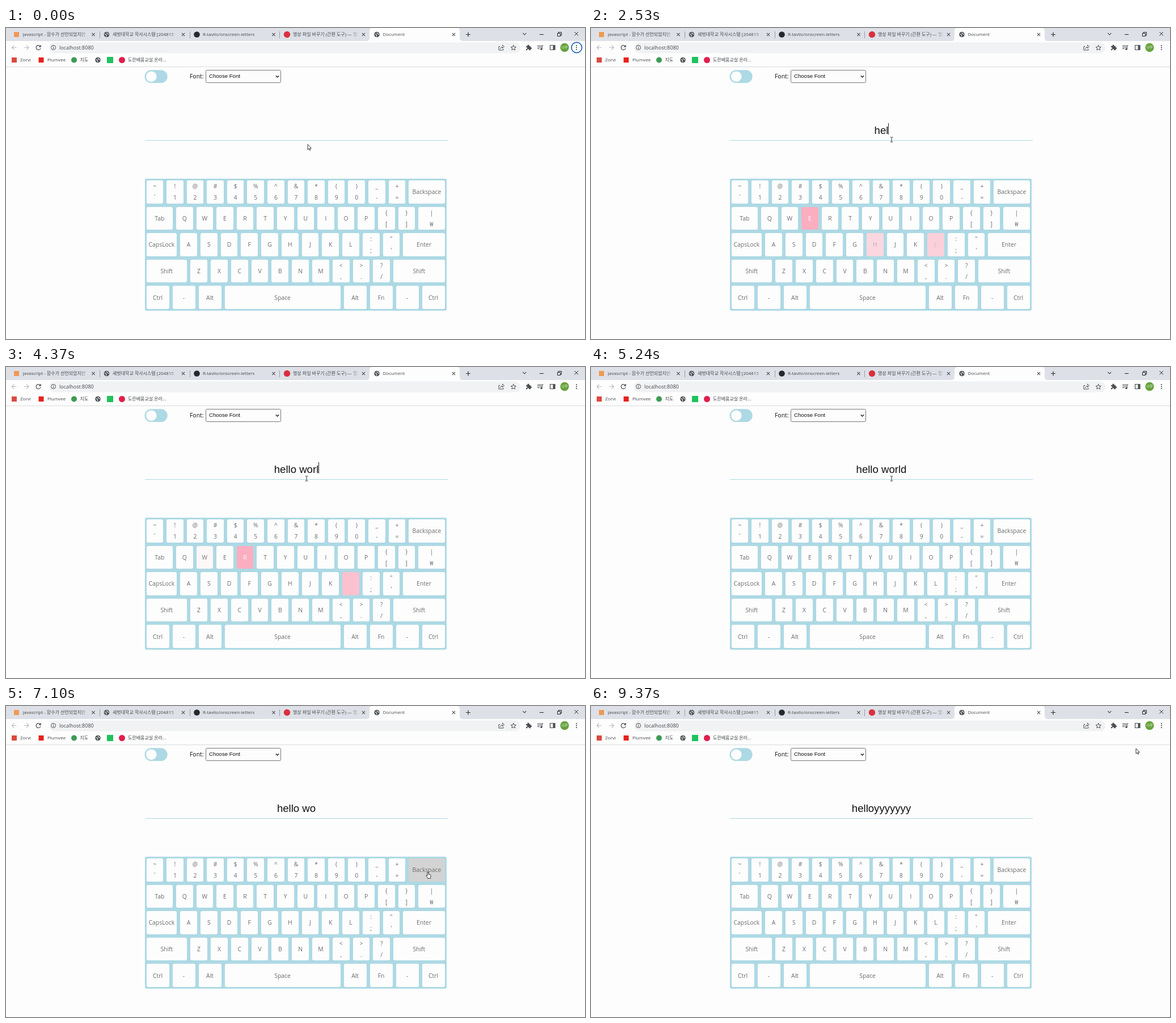
An HTML page for the animation above (9.4 s loop, 1021 by 549 pixels).

```html
<!DOCTYPE html>
<html lang="ko">
<head>
<meta charset="utf-8">
<title>Document</title>
<style>
  html, body { margin: 0; width: 100%; height: 100%; overflow: hidden; background: #fdfdfd; }
  #stage { position: relative; width: 1021px; height: 549px; overflow: hidden; background: #fdfdfd;
    font-family: "Open Sans", "Noto Sans CJK KR", "Noto Sans CJK", sans-serif; }
  #stage > * { position: absolute; }
  svg { left: 0; top: 0; }
  .label { white-space: pre; line-height: 16px; overflow: hidden; color: #45494d; }
  .fade { -webkit-mask-image: linear-gradient(90deg, #000 85%, transparent); mask-image: linear-gradient(90deg, #000 85%, transparent); }
  #field { left: 245px; top: 163px; width: 534px; height: 35px; border-bottom: 1.6px solid #add9e4;
    display: flex; justify-content: center; align-items: center; white-space: pre;
    font: 18.6px/21px "Liberation Sans", Arial, sans-serif; color: #111; }
  #text { position: relative; height: 21px; }
  #caret { position: absolute; left: 100%; top: -2px; width: 1px; height: 20px; background: #222; }
  #board { left: 244.5px; top: 266px; width: 532px; height: 232.5px; border-radius: 3px; background: #add9e4; }
  .row { position: absolute; left: 3px; width: 526.1px; height: 40.5px; display: flex; gap: 6px; }
  .key { flex: 1 1 0; min-width: 0; border-radius: 3px; display: flex; flex-direction: column;
    align-items: center; justify-content: center; font-size: 10.4px; line-height: 20px; white-space: pre; }
</style>
</head>
<body>
<div id="stage">
  <svg id="chrome" width="1021" height="549" fill="none" stroke="#4a4e52" stroke-width="1.2">
    <g stroke="none">
      <path fill="#dde1e7" d="M0 0H1021V23H0Z"/>
      <path fill="#fdfdfd" d="M635 23Q641 23 641 17V5Q641 0 646 0H795Q800 0 800 5V17Q800 23 806 23Z"/>
      <rect x="76" y="25.5" width="831" height="19" rx="9.5" fill="#f0f2f4"/>
      <path fill="#d9dbdf" d="M0 68H1021V69H0Z"/>
      <rect x="14" y="7" width="9" height="9" fill="#ee9a55"/>
      <circle cx="336.5" cy="11.5" r="5.3" fill="#24292e"/>
      <circle cx="495.5" cy="11.5" r="5.7" fill="#d9303e"/>
      <rect x="10" y="52" width="9" height="9" fill="#da4a40"/>
      <rect x="57.5" y="52" width="9" height="9" fill="#e8201c"/>
      <circle cx="120" cy="56.5" r="5" fill="#3d9b55"/>
      <rect x="178" y="51" width="11" height="11" fill="#1ec35c"/>
      <circle cx="204.5" cy="56.5" r="5.5" fill="#df1f4c"/>
      <circle cx="985" cy="34.5" r="7.7" fill="#65a23c"/>
      <rect x="244.5" y="74.3" width="40.2" height="22.8" rx="11.4" fill="#add9e4"/>
      <circle cx="256.3" cy="85.7" r="9.3" fill="#fdfdfd"/>
    </g>
    <path stroke="#9a9ea4" stroke-width="1" d="M165.5 6V18M324.5 6V18M482.5 6V18"/>
    <g id="closers" stroke-width="1.1"></g>
    <path stroke="#333" d="M811 11.5H819M815 7.5V15.5"/>
    <path d="M911.3 9L914.3 12L917.3 9" stroke-width="1.1"/>
    <path stroke="#222" stroke-width="1" d="M941 11.5H948M972.5 9.5H977.5V14.5H972.5ZM974 9.5V7.5H979.5V13H977.5M1002.5 7L1009 13.5M1009 7L1002.5 13.5"/>
    <path stroke="#b9bcc0" d="M18.5 34.5H10.5M14.2 30.7L10.4 34.5L14.2 38.3M32 34.5H40M36.3 30.7L40.1 34.5L36.3 38.3"/>
    <path d="M60.6 32.6A4 4 0 1 0 61 35.6M61.2 30V33.2H58"/>
    <path stroke-width="1" d="M83.5 33.8V37M83.5 31.6V32.8"/><circle cx="83.5" cy="34.5" r="4" stroke-width="1"/>
    <path stroke-width="1" d="M871 32.5H869V39H877V37M871.5 37Q872 33.5 875.5 33.5V36L878.5 32.8L875.5 30V32"/>
    <path stroke-width="1" d="M894.8 30.2L896.1 33.4L899.4 33.6L896.9 35.8L897.7 39L894.8 37.2L891.9 39L892.7 35.8L890.2 33.6L893.5 33.4Z"/>
    <path fill="#4a4e52" stroke="none" d="M917 32H919.5A1.7 1.7 0 1 1 922.5 32H925V34.3A1.6 1.6 0 1 1 925 37.3V39.3H922.3A1.6 1.6 0 1 0 919.3 39.3H917V36.8A1.5 1.5 0 1 0 917 34.2Z"/>
    <path d="M937 31.5H944M937 34H944M937 36.5H941M945.2 37V31H947.5"/><circle cx="944" cy="37.2" r="1.2" fill="#4a4e52"/>
    <path d="M959.5 30.5H968V38.5H959.5Z"/><path fill="#4a4e52" stroke="none" d="M964.5 30H968V39H964.5Z"/>
    <g fill="#44484c" stroke="none"><circle cx="1006" cy="31" r="1.1"/><circle cx="1006" cy="34.5" r="1.1"/><circle cx="1006" cy="38" r="1.1"/></g>
    <circle id="ring" cx="1006.3" cy="34.5" r="9.2" stroke="#1f5fb8" stroke-width="1.7"/>
    <g id="globes"></g>
    <rect x="352.5" y="74.5" width="132" height="22" rx="2" stroke="#767676" stroke-width="1"/>
    <path stroke="#222" stroke-width="1.4" d="M475.8 84.3L478.5 87L481.2 84.3"/>
  </svg>
  <div id="field"><span id="text"><span id="typed"></span><i id="caret"></i></span></div>
  <div id="board"></div>
  <svg width="1021" height="549" stroke-linejoin="round">
    <g id="cursor">
      <path id="arrow" fill="#fff" stroke="#222" stroke-width=".9" d="M0 0V9.2L2.1 7.3L3.5 10.3L4.9 9.6L3.6 6.7H6.3Z"/>
      <path id="beam" fill="none" stroke="#333" stroke-width="1" d="M-2.3 -4.2H-.5L0 -3.7L.5 -4.2H2.3M0 -3.7V3.7M-2.3 4.2H-.5L0 3.7L.5 4.2H2.3"/>
      <path id="hand" fill="#fff" stroke="#222" stroke-width=".9" d="M-1 .8Q0 -.6 1 .8V4.2L4.4 5Q5.4 5.4 5.2 6.8L4.6 9.3V11.3H-.4V9.8L-3 6.8Q-3 5.3 -1.8 5.8L-1 6.7Z"/>
    </g>
  </svg>
</div>
<script>
const LOOP = 9400, FADE = 250, FOCUS = 1300, BLUR = 6790;
const $ = id => document.getElementById(id);
const stage = $('stage');

function label(x, y, size, text, width, color) {
  const el = document.createElement('div');
  el.className = width ? 'label fade' : 'label';
  el.textContent = text;
  el.style.cssText = `left:${x}px;top:${y - 8}px;font-size:${size}px;` +
    (width ? `width:${width}px;` : '') + (color ? `color:${color};` : '');
  stage.append(el);
  return el;
}

// Browser window
label(29.5, 11.3, 8, 'javascript - 함수가 선언되었지만', 117);
label(188, 11.3, 8, '새벗대학교 학사시스템 [204815', 118);
label(347, 11.3, 8, 'R-tavilo/onscreen-letters');
label(506, 11.3, 8, '영상 파일 바꾸기 (간편 도구) — 열기', 117);
label(664.5, 11.3, 7.9, 'Document');
label(94, 34.8, 9, 'localhost:8080');
label(25, 56.3, 8, 'Zorvi');
label(73, 56.3, 8, 'Plumvee');
label(130.5, 56.3, 8, '지도');
label(215, 56.3, 8, '도란배움교실 온라...');
label(979.5, 34.3, 6, '나무', 0, '#fff');
label(324, 85.2, 10.4, 'Font:', 0, '#111');
label(358, 85.4, 9.6, 'Choose Font', 0, '#111').style.fontFamily = '"Liberation Sans", Arial, sans-serif';

$('closers').innerHTML = [154, 312.5, 472, 630.5, 789.5].map(x =>
  `<path d="M${x - 2.6} 8.9l5.2 5.2m0-5.2l-5.2 5.2"/>`).join('');
$('globes').innerHTML = [[177.5, 11.5], [654, 11.5], [162, 56.5]].map(([x, y]) =>
  `<circle cx="${x}" cy="${y}" r="4.8" fill="#4d5256" stroke="none"/>
   <path stroke="#e4e7ea" d="M${x - 3.5} ${y - .8}q2.5 .2 3 2t-.6 2.4M${x + .5} ${y - 3.7}q-.6 2 1.2 2.2t1.6 2"/>`).join('');

// Keyboard: "name:width" is fixed, otherwise keys share the rest of the row
const rows = [
  '~` !1 @2 #3 $4 %5 ^6 &7 *8 (9 )0 _- += Backspace:63.3',
  'Tab:46.5 Q W E R T Y U I O P {[ }] |₩:46.4',
  'CapsLock:53.7 A S D F G H J K L :; "\' Enter:73.4',
  'Shift:71.7 Z X C V B N M <, >. ?/ Shift:90.4',
  'Ctrl:40 -:40 Alt:40 Space Alt:40 Fn:40 -:40 Ctrl:40'
];
const keys = [];
rows.forEach((line, i) => {
  const row = document.createElement('div');
  row.className = 'row';
  row.style.top = 3 + i * 46.6 + 'px';
  $('board').append(row);
  for (const part of line.split(' ')) {
    const [, name, width] = part.match(/^(.+?)(?::([\d.]+))?$/);
    const el = document.createElement('div');
    el.className = 'key';
    if (width) el.style.flex = `0 0 ${width}px`;
    for (const s of name.length === 2 && name !== 'Fn' ? name : [name]) {
      const line = document.createElement('span');
      line.textContent = s;
      el.append(line);
    }
    row.append(el);
    keys.push({ name, el });
  }
});
for (const k of keys) k.box = k.el.getBoundingClientRect();

// Key presses: start, hold time, key
const presses = [
  [2150, 250, 'H'], [2270, 260, 'E'], [2390, 160, 'L'], [2660, 80, 'L'], [2800, 90, 'O'],
  [3680, 80, 'Space'], [3920, 220, 'W'], [4010, 70, 'O'], [4090, 300, 'R'], [4180, 230, 'L'], [4480, 100, 'D'],
  [5250, 100, 'Backspace'], [5600, 560, 'Backspace'],
  ...[6790, 7180, 7380, 7580].map(t => [t, 60, 'Backspace']),
  ...Array.from({ length: 7 }, (_, i) => [8000 + i * 115, 60, 'Y'])
];
// Pointer path: time, x, y
const path = [
  [0, 532, 205.5], [700, 532, 205.5], [1100, 530, 197], [6300, 530, 197], [6700, 744, 293],
  [7700, 744, 293], [7950, 493, 338], [8820, 493, 338], [9280, 961, 75], [LOOP, 961, 75]
];

function pointer(t) {
  if (t <= 0) return path[0].slice(1);
  const i = path.findIndex(p => p[0] > t);
  const [t0, x0, y0] = path[i - 1], [t1, x1, y1] = path[i];
  const u = (t - t0) / (t1 - t0), e = u * u * (3 - 2 * u);
  return [x0 + (x1 - x0) * e, y0 + (y1 - y0) * e];
}
const inside = (b, [x, y]) => x >= b.left && x <= b.right && y >= b.top && y <= b.bottom;
const mix = (a, b, u) => a.map((v, i) => v + (b[i] - v) * u);
const rgb = c => `rgb(${c.map(Math.round)})`;
const WHITE = [253, 253, 253], GRAY = [211, 211, 211], PINK = [251, 174, 192], INK = [108, 108, 108];
const fieldBox = { left: 245, right: 779, top: 163, bottom: 199 };

// A linear transition equals the share of the last FADE ms spent in the state
function pressLevel(name, t) {
  let sum = 0;
  for (const [start, hold, key] of presses)
    if (key === name) sum += Math.max(0, Math.min(t, start + hold) - Math.max(t - FADE, start));
  return Math.min(1, sum / FADE);
}

function render(t) {
  let text = '', last = FOCUS;
  for (const [start, , key] of presses) {
    if (start > t) break;
    last = start;
    text = key === 'Backspace' ? text.slice(0, -1) : text + (key === 'Space' ? ' ' : key.toLowerCase());
  }
  $('typed').textContent = text;
  const caretOn = t >= FOCUS && t < BLUR && Math.floor((t - last) / 500) % 2 === 0;
  $('caret').style.display = caretOn ? 'block' : 'none';
  $('ring').style.display = t < FOCUS ? '' : 'none';

  const trail = Array.from({ length: 16 }, (_, i) => pointer(t - i * FADE / 16));
  for (const { name, el, box } of keys) {
    const hover = trail.filter(p => inside(box, p)).length / trail.length;
    const press = pressLevel(name, t);
    el.style.background = rgb(mix(mix(WHITE, GRAY, hover), PINK, press));
    el.style.color = rgb(mix(INK, WHITE, press));
  }

  const at = trail[0];
  const shape = inside(fieldBox, at) ? 'beam' : keys.some(k => inside(k.box, at)) ? 'hand' : 'arrow';
  for (const id of ['arrow', 'beam', 'hand']) $(id).style.display = id === shape ? '' : 'none';
  $('cursor').setAttribute('transform', `translate(${at})`);
}

function frame() {
  render(performance.now() % LOOP);
  requestAnimationFrame(frame);
}
frame();
</script>
</body>
</html>
```
